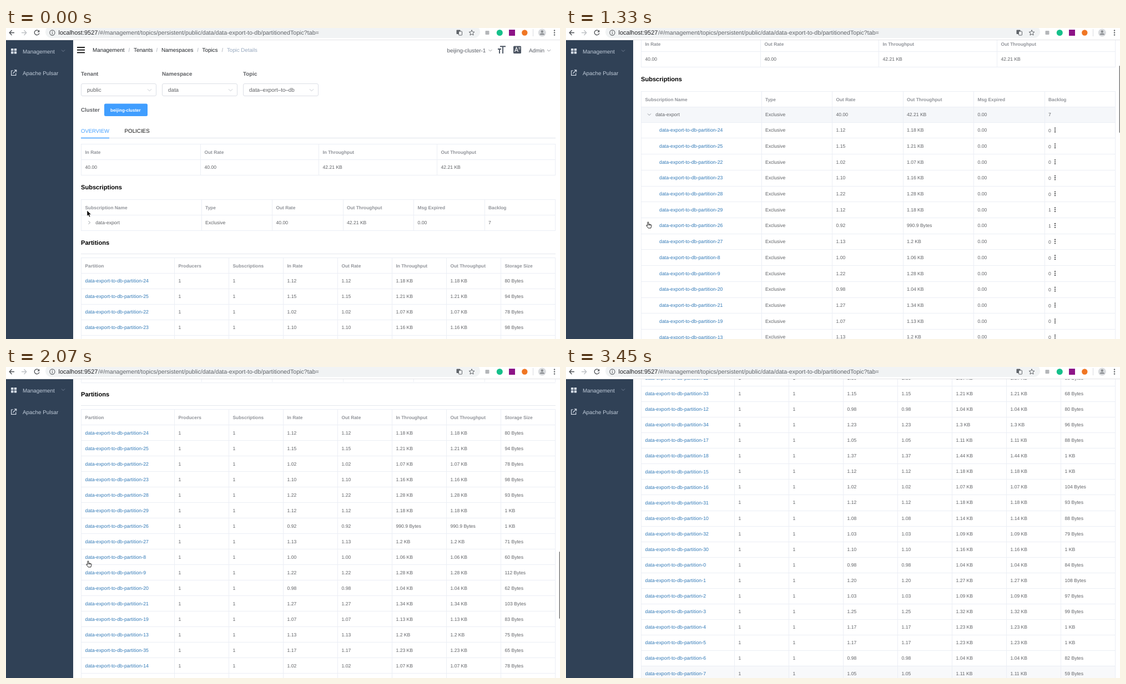
An HTML page for the animation above (3.84 s loop, 998x561 px).

```html
<!DOCTYPE html>
<html lang="en">
<head>
<meta charset="utf-8">
<title>Topic Details</title>
<style>
  html, body { margin: 0; width: 100%; height: 100%; overflow: hidden; background: #fff; }
  svg { display: block; width: 998px; height: 561px; }
  text { font-family: "Liberation Sans", Arial, sans-serif; text-rendering: geometricPrecision; white-space: pre; }
  .line { shape-rendering: crispEdges; }
</style>
</head>
<body>
<svg id="stage" viewBox="0 0 998 561"></svg>
<script>
const NS = 'http://www.w3.org/2000/svg';
const stage = document.getElementById('stage');

// style: size, weight, colour
const STYLES = {
  cell: [8.6, 400, '#606266'],
  link: [8.8, 400, '#337ab7'],
  head: [8.35, 700, '#909399'],
  title: [11.1, 700, '#000'],
  label: [9.8, 700, '#606266'],
  input: [9.8, 400, '#606266'],
  crumb: [9.85, 400, '#1f2328'],
  slash: [9.8, 700, '#c0c4cc'],
  here: [9.7, 400, '#97a8be'],
  nav: [9.9, 400, '#5a5e66'],
  side: [9.9, 400, '#bfcbd9'],
  tabOn: [9.5, 400, '#409eff'],
  tab: [9.8, 400, '#111'],
  button: [8, 700, '#fff'],
  host: [11, 400, '#202124'],
  path: [10.66, 400, '#5f6368']
};

function add(parent, tag, attrs) {
  const node = document.createElementNS(NS, tag);
  for (const key in attrs) node.setAttribute(key, attrs[key]);
  parent.appendChild(node);
  return node;
}
const group = parent => add(parent, 'g', {});
const rect = (p, x, y, width, height, fill, rx = 0) => add(p, 'rect', { x, y, width, height, fill, rx });
const circle = (p, cx, cy, r, fill) => add(p, 'circle', { cx, cy, r, fill });
const stroke = (p, d, colour, width = 1, fill = 'none') =>
  add(p, 'path', { d, fill, stroke: colour, 'stroke-width': width });
const chevron = (p, x, y, colour, w = 3.6) =>
  stroke(p, `M${x - w} ${y - w / 2}l${w} ${w}l${w} ${-w}`, colour, 0.9);

// y is the middle of the capitals
function text(p, x, y, str, style) {
  const [size, weight, fill] = STYLES[style];
  add(p, 'text', { x, y: y + size * 0.36, 'font-size': size, 'font-weight': weight, fill }).textContent = str;
}

const BORDER = '#ebeef5';
function line(p, x, y, w, h, colour = BORDER) {
  rect(p, x, y, w, h, colour).setAttribute('class', 'line');
}
const hline = (p, y, colour) => line(p, 135, y, 855, 1, colour);
const columns = (p, cols, y, h) => [...cols, 989].forEach(x => line(p, x, y, 1, h));
function row(p, cols, y, values, style, first = style) {
  values.forEach((v, i) => text(p, cols[i] + 7.5, y, v, i ? style : first));
}

// partition data: ids, messages per minute, stored bytes (0 = one waiting message, 1 KB)
const list = str => str.split(' ').map(Number);
const ids = list('24 25 22 23 28 29 26 27 8 9 20 21 19 13 35 14 11 33 12 34 17 18 15 16 31 10 32 30 0 1 2 3 4 5 6 7');
const perMinute = list('67 69 61 66 73 67 55 68 60 73 59 76 64 68 70 61 78 69 59 74 63 82 67 61 67 65 62 66 59 72 62 75 70 70 59 63');
const stored = list('80 94 78 98 93 0 0 71 60 112 62 103 83 75 65 78 88 68 80 96 88 0 0 104 93 88 79 0 84 108 97 99 0 0 82 59');
const partitions = ids.map((id, i) => {
  const rate = perMinute[i] / 60;
  const kb = rate * 1.0556;
  return {
    name: 'data-export-to-db-partition-' + id,
    rate: rate.toFixed(2),
    flow: kb < 1 ? (kb * 1024).toFixed(1) + ' Bytes' : +kb.toFixed(2) + ' KB',
    backlog: stored[i] ? 0 : 1,
    size: stored[i] ? stored[i] + ' Bytes' : '1 KB'
  };
});

const SUB_H = 28.72, PART_H = 28.02;
const OPEN_H = SUB_H * partitions.length;

rect(stage, 0, 0, 998, 561, '#fff');
const page = group(stage);

function drawHeader(p) {
  [34, 38.7, 43.4].forEach(y => rect(p, 128, y, 14, 1.9, '#111'));
  [[156, 'Management'], [230, 'Tenants'], [280, 'Namespaces'], [353.5, 'Topics']]
    .forEach(([x, s]) => text(p, x, 39.5, s, 'crumb'));
  [220.5, 270.5, 344.3, 388.5].forEach(x => text(p, x, 39.5, '/', 'slash'));
  text(p, 398, 39.5, 'Topic Details', 'here');
  text(p, 794.5, 40, 'beijing-cluster-1', 'nav');
  chevron(p, 872.5, 40.5, '#909399', 3);
  stroke(p, 'M890 33.3h10M895 33v13M886 38h6M889 38v8', '#4d5663', 1.9);
  rect(p, 914, 32.5, 14, 13.5, '#4d5663', 1.5);
  stroke(p, 'M916.5 43l3-8l3 8M917.5 40.5h4', '#fff', 1.1);
  stroke(p, 'M923 35.5h4M925 34.5v1M923.5 39l3-3M926.5 39l-3-3', '#fff', 0.6);
  text(p, 942, 40, 'Admin', 'nav');
  chevron(p, 978, 40.5, '#909399', 3);
}

function drawFilters(p) {
  [[135, 'Tenant', 'public'], [281, 'Namespace', 'data'], [427, 'Topic', 'data–export–to–db']]
    .forEach(([x, label, value]) => {
      text(p, x, 82, label, 'label');
      add(p, 'rect', { x: x + 0.5, y: 100.5, width: 135, height: 22, rx: 2.5, fill: '#fff', stroke: '#dcdfe6' });
      text(p, x + 11, 111.7, value, 'input');
      chevron(p, x + 123.5, 112, '#c0c4cc');
    });
  text(p, 135, 147, 'Cluster', 'label');
  rect(p, 177, 136.5, 78, 22.5, '#409eff', 2.5);
  text(p, 188, 147.7, 'beijing-cluster', 'button');
  text(p, 135, 185.7, 'OVERVIEW', 'tabOn');
  text(p, 213.5, 185.7, 'POLICIES', 'tab');
  hline(p, 198, '#dfe3ea');
  rect(p, 135, 197.7, 51, 1.5, '#409eff');
}

function drawRates(p) {
  const cols = [135, 350, 563, 776];
  [209, 237, 265].forEach(y => hline(p, y));
  columns(p, cols, 209, 57);
  row(p, cols, 224, ['In Rate', 'Out Rate', 'In Throughput', 'Out Throughput'], 'head');
  row(p, cols, 251.3, ['40.00', '40.00', '42.21 KB', '42.21 KB'], 'cell');
}

const subCols = [135, 351.5, 479, 606.5, 734, 861.5];
const subHover = rect(page, 135, 337, 854, 28, '#f5f7fa');
drawHeader(page);
drawFilters(page);
drawRates(page);

text(page, 135, 287.5, 'Subscriptions', 'title');
[309, 337, 365].forEach(y => hline(page, y));
columns(page, subCols, 309, 57);
row(page, subCols, 323.6, ['Subscription Name', 'Type', 'Out Rate', 'Out Throughput', 'Msg Expired', 'Backlog'], 'head');
row(page, subCols, 351, ['', 'Exclusive', '40.00', '42.21 KB', '0.00', '7'], 'cell');
text(page, 161.3, 351, 'data-export', 'cell');
const toggle = stroke(page, 'M-1.5 -3l3 3l-3 3', '#8b8f96', 0.9);

// nested rows shown when the subscription is open
const nested = group(page);
columns(nested, subCols, 365, OPEN_H);
partitions.forEach((d, i) => {
  const top = 365 + i * SUB_H, y = top + 14;
  row(nested, subCols, y, ['', 'Exclusive', d.rate, d.flow, '0.00'], 'cell');
  text(nested, 168, y, d.name, 'link');
  text(nested, 869, y + 0.7, d.backlog, 'cell');
  [-3.4, 0, 3.4].forEach(dy => circle(nested, 881, y + dy, 1.05, '#303133'));
  hline(nested, Math.round(top + SUB_H - 0.3));
});

// partitions section, pushed down by the nested rows
const lower = group(page);
const partCols = [135, 303, 401, 499, 597, 695, 793, 891];
const partHover = rect(lower, 135, 0, 854, PART_H, '#f8f9fb');
text(lower, 135, 387, 'Partitions', 'title');
hline(lower, 407, '#e4e7ed');
[414, 442].forEach(y => hline(lower, y));
columns(lower, partCols, 414, 29 + PART_H * partitions.length);
row(lower, partCols, 428.7, ['Partition', 'Producers', 'Subscriptions', 'In Rate', 'Out Rate',
  'In Throughput', 'Out Throughput', 'Storage Size'], 'head');
partitions.forEach((d, i) => {
  row(lower, partCols, 456 + i * PART_H, [d.name, 1, 1, d.rate, d.rate, d.flow, d.flow, d.size], 'cell', 'link');
  hline(lower, Math.round(442 + (i + 1) * PART_H));
});

const bar = rect(stage, 996.6, 0, 1.4, 121, '#777', 0.7);

// sidebar
rect(stage, 0, 22, 121, 539, '#304156');
const side = group(stage);
[[9, 37], [14.7, 37], [9, 42.2], [14.7, 42.2]].forEach(([x, y]) => rect(side, x, y, 4.5, 4.2, '#d3dbe5', 0.6));
text(side, 30, 42, 'Management', 'side');
chevron(side, 103, 41, '#76859a', 3);
stroke(side, 'M13 77H9.6v8.4h8.2V81.5M12.5 82l6-6M15 75.8h3.7v3.7', '#d3dbe5', 1.2);
text(side, 30, 81.3, 'Apache Pulsar', 'side');

// browser toolbar
function drawToolbar(p) {
  rect(p, 0, 0, 998, 22, '#fff');
  rect(p, 71, -4, 783, 22, '#f1f3f4', 11);
  rect(p, 0, 21, 998, 1, '#e2e3e5');
  stroke(p, 'M15 8.5H6.5M10.5 4l-4.3 4.5l4.3 4.5', '#4a4d51', 1.3);
  stroke(p, 'M28 8.5h8.5M32.5 4l4.3 4.5l-4.3 4.5', '#bdc0c4', 1.3);
  stroke(p, 'M59 5.4a4.4 4.4 0 1 0 .9 4', '#4a4d51', 1.3);
  add(p, 'path', { d: 'M60.3 3.5v4h-4z', fill: '#4a4d51' });
  stroke(p, 'M78.8 8.5a4.6 4.6 0 1 0 9.2 0a4.6 4.6 0 1 0 -9.2 0M83.4 7.8v3.2M83.4 5.8v1.1', '#5f6368', 1.1);
  text(p, 94.5, 8.3, 'localhost:9527', 'host');
  text(p, 166, 8.3, '/#/management/topics/persistent/public/data/data-export-to-db/partitionedTopic?tab=', 'path');
  rect(p, 811.5, 3.5, 7, 7.5, '#5f6368', 1);
  add(p, 'rect', { x: 815.5, y: 6, width: 6, height: 7, rx: 0.8, fill: '#f1f3f4', stroke: '#5f6368' });
  let star = '';
  for (let i = 0; i < 10; i++) {
    const r = i % 2 ? 2.3 : 5.2, a = i * Math.PI / 5;
    star += (i ? 'L' : 'M') + (839 + r * Math.sin(a)) + ' ' + (8.8 - r * Math.cos(a));
  }
  stroke(p, star + 'Z', '#5f6368', 1);
  rect(p, 863.5, 5, 7, 7, '#b4b6b9', 1);
  circle(p, 889.3, 8.5, 5.5, '#15c08a');
  rect(p, 906, 3, 11, 11, '#8d1487');
  circle(p, 934.3, 8.5, 5.2, '#f07623');
  rect(p, 949, 2, 1, 13, '#dadce0');
  circle(p, 965.8, 8.5, 7, '#d9dbde');
  circle(p, 965.8, 6.5, 2.2, '#8a8d91');
  add(p, 'path', { d: 'M961.5 12.3q0-2.8 4.3-2.8t4.3 2.8z', fill: '#8a8d91' });
  [4.5, 8.5, 12.5].forEach(y => circle(p, 988, y, 1.2, '#5f6368'));
}
drawToolbar(stage);

const cursors = {
  arrow: add(stage, 'path', {
    d: 'M0 0V10.3L2.3 8.2L4 12L5.8 11.2L4.2 7.5H7.4Z',
    fill: '#000', stroke: '#fff', 'stroke-width': 0.6
  }),
  hand: stroke(stage, 'M2.9 1.5q1-1.3 2 0V4.8l3.7 .8q1.5 .4 1.4 1.8L9.3 10L8.8 12H4.2L1 7.9q-.6-1.6 1-1.2L2.9 7.6ZM5 5v2M6.7 5.4v1.8M8.3 5.8v1.5', '#111', 0.9, '#fff')
};

// each step changes only the values it names
const LOOP = 3840, MAX_SCROLL = 1918;
const changes = [
  [0, { scroll: 0, cursor: 'arrow', x: 146, y: 329, open: false, turn: 0, bar: false, hover: -1 }],
  [150, { y: 342 }],
  [300, { cursor: 'hand', x: 144, y: 349 }],
  [740, { open: true, turn: 45 }],
  [890, { turn: 90 }],
  [1030, { scroll: 36, bar: true }],
  [1180, { scroll: 105 }],
  [1330, { scroll: 195 }],
  [1480, { scroll: 330 }],
  [1630, { scroll: 491 }],
  [1780, { scroll: 748 }],
  [1920, { scroll: 1045 }],
  [2070, { scroll: 1371.5 }],
  [2240, { scroll: 1700 }],
  [2390, { scroll: 1937, cursor: 'arrow', x: 147, y: 349 }],
  [2540, { scroll: 1926 }],
  [2680, { scroll: 1920, x: 480, y: 400 }],
  [2860, { scroll: 1918, x: 802, y: 449 }],
  [3000, { x: 925, y: 485, bar: false }],
  [3150, { x: 990, y: 513 }],
  [3300, { x: 979, y: 554, hover: 35 }],
  [3450, { cursor: '' }]
];
let state = {};
const steps = changes.map(([at, change]) => ({ at, ...(state = { ...state, ...change }) }));

const move = (node, x, y) => node.setAttribute('transform', `translate(${x} ${y})`);
const show = (node, on) => node.setAttribute('visibility', on ? 'visible' : 'hidden');

function draw(s) {
  move(page, 0, -s.scroll);
  move(side, 0, Math.min(0, MAX_SCROLL - s.scroll));
  move(lower, 0, s.open ? OPEN_H : 0);
  show(nested, s.open);
  show(subHover, s.open);
  toggle.setAttribute('transform', `translate(150 351) rotate(${s.turn})`);
  show(partHover, s.hover >= 0);
  partHover.setAttribute('y', 442 + s.hover * PART_H);
  show(bar, s.bar);
  bar.setAttribute('y', 24 + s.scroll * 0.2253);
  for (const name in cursors) {
    show(cursors[name], name === s.cursor);
    move(cursors[name], s.x, s.y);
  }
}

const start = performance.now();
let current = null;
function tick() {
  const t = (performance.now() - start) % LOOP;
  const step = steps.findLast(s => s.at <= t);
  if (step !== current) draw(current = step);
  requestAnimationFrame(tick);
}
tick();
</script>
</body>
</html>
```
